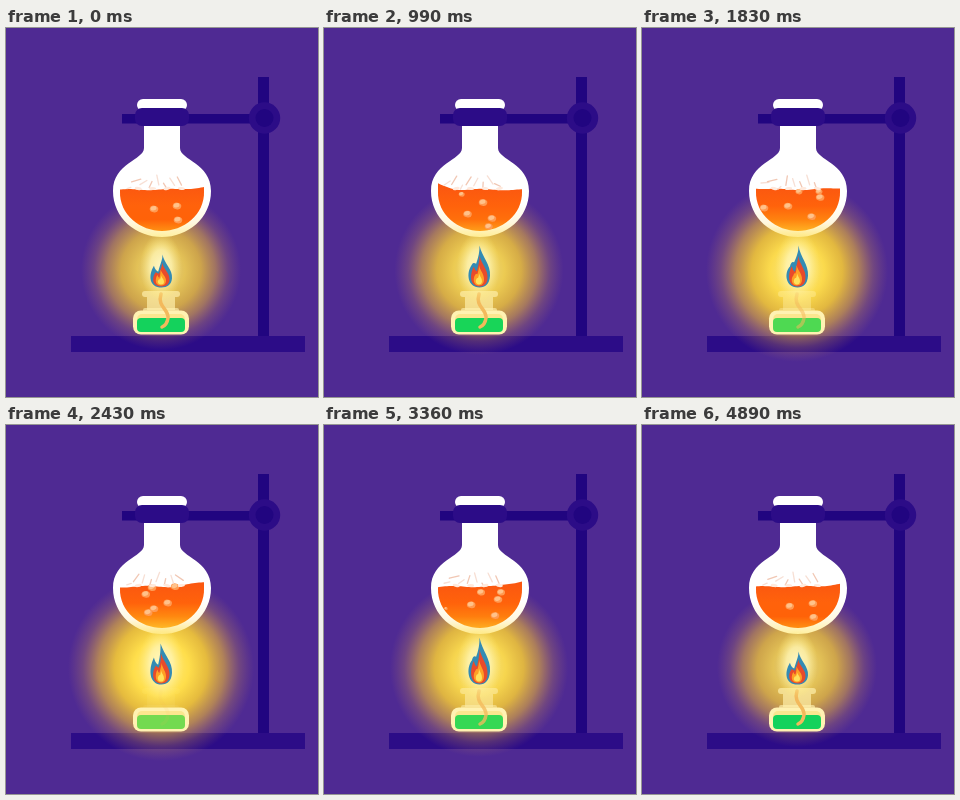
Recreate the animation shown at these times as an HTML page with a canvas. Size 312 by 369 pixels, loop 4.92 s.

```html
<!DOCTYPE html>
<html lang="en">
<head>
<meta charset="utf-8">
<title>Flask over a burner</title>
<style>
html, body { margin: 0; width: 100%; height: 100%; overflow: hidden; background: #4f2a93; }
canvas { display: block; width: 312px; height: 369px; }
</style>
</head>
<body>
<canvas id="stage" width="312" height="369"></canvas>
<script>
const c = document.getElementById('stage').getContext('2d');
const LOOP = 4920, BOIL = 1640, STEP = 30, TAU = Math.PI * 2;
const DARK = '#210580', MID = '#2c0c87';

// Smooth interpolation through [time, value...] rows.
function keyed(rows, t) {
  let i = 0;
  while (i < rows.length - 2 && t >= rows[i + 1][0]) i++;
  const a = rows[i], b = rows[i + 1];
  const u = (t - a[0]) / (b[0] - a[0]);
  const e = u * u * (3 - 2 * u);
  return a.slice(1).map((v, k) => v + (b[k + 1] - v) * e);
}

function box(x, y, w, h, r, fill) {
  c.fillStyle = fill;
  c.beginPath();
  c.roundRect(x, y, w, h, r);
  c.fill();
}

function oval(x, y, rx, ry, fill, turn = 0) {
  c.fillStyle = fill;
  c.beginPath();
  c.ellipse(x, y, rx, ry, turn, 0, TAU);
  c.fill();
}

function shade(g, stops) {
  for (const [p, color] of stops) g.addColorStop(p, color);
  return g;
}

function stand() {
  box(252, 49, 11, 259, 0, DARK);
  box(65, 308, 234, 16, 0, MID);
}

function clamp() {
  box(116, 86, 140, 9.5, 0, DARK);
  box(129, 80, 54, 18, 7, MID);
  oval(258.5, 90, 15.7, 15.7, MID);
  oval(258.5, 90, 9, 9, DARK);
}

function glow(heat) {
  const r = 80 + 13 * heat, a = 0.84 + 0.16 * heat;
  const y = 242 + heat;
  const g = c.createRadialGradient(155, y, 0, 155, y, r);
  c.fillStyle = shade(g, [
    [0, `rgba(255,238,140,${a})`],
    [0.3, `rgba(255,222,75,${a})`],
    [0.5, `rgba(250,207,50,${a * 0.88})`],
    [0.68, `rgba(240,188,50,${a * 0.6})`],
    [0.84, `rgba(225,165,65,${a * 0.24})`],
    [1, 'rgba(205,140,90,0)']
  ]);
  c.fillRect(155 - r, y - r, r * 2, r * 2);
}

function burner(heat) {
  const fade = heat ** 4;
  c.globalAlpha = 0.68 - 0.6 * fade;
  box(136, 263, 38, 6, 3, '#fff0ae');
  box(141, 269, 28, 13, 0, '#fff0ae');
  box(137, 280, 36, 5, 2, '#fff0ae');
  c.globalAlpha = 1;
  box(127, 282.5, 56, 24, 8, '#fff2b2');
  box(131, 286, 48, 17, 5, '#fbe68f');
  const green = `rgb(${20 + 95 * heat ** 3},${210 + 8 * heat},${92 - 12 * heat})`;
  box(131, 290, 48, 14, 4, green);
  c.globalAlpha = 1 - 0.9 * fade;
  c.strokeStyle = '#f3b95c';
  c.lineWidth = 3.5;
  c.lineCap = 'round';
  c.beginPath();
  c.moveTo(155, 266);
  c.bezierCurveTo(151, 279, 163, 281, 162, 290);
  c.quadraticCurveTo(161, 297, 156, 299);
  c.stroke();
  c.globalAlpha = 1;
}

function flask(heat) {
  const warm = `rgb(255,${240 - 8 * heat},${160 - 30 * heat})`;
  box(131, 71, 50, 12, 6, '#fff');
  c.fillStyle = shade(c.createLinearGradient(0, 80, 0, 209), [
    [0, '#fff'], [0.74, '#fff'], [0.89, '#fff8df'], [1, warm]
  ]);
  c.beginPath();
  c.moveTo(138, 79);
  c.lineTo(138, 120);
  c.bezierCurveTo(138, 132, 107, 135, 107, 163);
  c.bezierCurveTo(107, 190, 130, 209, 156, 209);
  c.bezierCurveTo(182, 209, 205, 190, 205, 163);
  c.bezierCurveTo(205, 135, 174, 132, 174, 120);
  c.lineTo(174, 79);
  c.fill();
}

// Surface height over time: left side, right side.
const SLOSH = [[0, 162, 159], [990, 156, 162], [1830, 160, 160], [2430, 162, 157],
  [3360, 162, 156], [4050, 155, 161], [LOOP, 162, 159]];

// Slow bubbles: birth time and place, place at each boil start, end time and place.
const RISERS = [
  [-1160, 140, 190, 148, 181, 1150, 136, 164],
  [-840, 167, 194, 171, 178, 400, 186, 160],
  [-800, 163, 200, 172, 192, 1300, 155, 169]
];

// Short-lived bubbles: time, x, y.
const POPS = [[120, 157, 166], [120, 177, 166], [190, 122, 180],
  [780, 146, 163], [780, 169, 162], [780, 148, 184]];

function bubble(x, y, s) {
  oval(x, y, 4.3 * s, 3.3 * s, '#ff9a52', 0.2);
  oval(x - 0.5, y - 0.7, 3 * s, 2.1 * s, '#ffc28a', -0.3);
}

function bubbles(p) {
  for (const [t0, x0, y0, x, y, t1, x1, y1] of RISERS) {
    for (const q of [p, p - BOIL]) {
      if (q < t0 || q > t1) continue;
      const u = q < 0 ? q / t0 : q / t1;
      const [ex, ey] = q < 0 ? [x0, y0] : [x1, y1];
      bubble(x + (ex - x) * u, y + (ey - y) * u, Math.min(1, (1 - u) * 5));
    }
  }
  for (const [t, x, y] of POPS) {
    const u = (p - t) / 120;
    if (Math.abs(u) < 1) bubble(x, y - 4 * u, Math.sqrt(1 - u * u));
  }
}

function liquid(t, heat) {
  const [left, right] = keyed(SLOSH, t);
  const w = t / BOIL * TAU;
  const surface = x => {
    const l = Math.max(0, (140 - x) / 26), r = Math.max(0, (x - 172) / 26);
    return 161.5 + (left - 161.5) * l * l + (right - 161.5) * r + 0.7 * Math.sin(x / 7 - 3 * w);
  };
  c.save();
  c.beginPath();
  c.moveTo(114, 145);
  c.lineTo(198, 145);
  c.lineTo(198, 163);
  c.bezierCurveTo(199, 187, 177, 203, 156, 203);
  c.bezierCurveTo(135, 203, 113, 187, 114, 163);
  c.clip();

  c.fillStyle = shade(c.createLinearGradient(0, 159, 0, 204), [
    [0, '#fb5810'], [0.42, '#ff620b'],
    [0.72, `rgb(255,${98 + 38 * heat},${8 + 8 * heat})`],
    [1, `rgb(255,${148 + 40 * heat},${20 + 20 * heat})`]
  ]);
  c.beginPath();
  c.moveTo(113, 205);
  for (let x = 113; x <= 199; x += 2) c.lineTo(x, surface(x));
  c.lineTo(199, 205);
  c.fill();
  bubbles(t % BOIL);
  c.restore();

  // Flecks thrown up along the surface.
  c.lineCap = 'round';
  c.lineWidth = 1.3;
  for (let i = 0; i < 8; i++) {
    const jump = Math.sin((t / BOIL * 2 + i * 0.381) % 1 * Math.PI);
    const x = 123 + i * 7.2, y = 160 - 8 * jump, size = 2 + 3 * jump;
    const turn = -0.35 - i * 0.28 + 0.4 * Math.sin(w + i);
    const dx = size * Math.cos(turn), dy = size * Math.sin(turn);
    c.strokeStyle = i % 2 ? 'rgba(238,185,160,.8)' : 'rgba(246,220,207,.9)';
    c.beginPath();
    c.moveTo(x - dx, y - dy);
    c.lineTo(x + dx, y + dy);
    c.stroke();
    if (i % 2) oval(x + 2, 160.5, 3.5, 1.5, '#ffe9dc', 0.2 * Math.sin(w + i));
  }
}

// Flame poses: time, height, side tongue, lean.
const FLAME = [[0, 33, 1, 1], [480, 40, .3, 1], [990, 42, .3, 0], [1400, 35, .9, -1],
  [1830, 42, 0, 1], [2430, 41, 1, -1], [2900, 35, .4, 1], [3360, 47, .1, 0],
  [4050, 33, .7, 1], [4450, 40, .2, 0], [LOOP, 33, 1, 1]];

function tongue(x, y, h, w, side, lean, fill) {
  const notch = 0.6 - 0.12 * side;
  c.fillStyle = fill;
  c.beginPath();
  c.moveTo(x, y);
  c.bezierCurveTo(x - w * 1.15, y, x - w * 1.3, y - h * 0.35, x - w * 0.72, y - h * (0.5 + 0.16 * side));
  c.quadraticCurveTo(x - w * 0.6, y - h * (notch + 0.04), x - w * 0.32, y - h * notch);
  c.bezierCurveTo(x - w * 0.08, y - h * 0.74, x + lean, y - h * 0.84, x + lean, y - h);
  c.bezierCurveTo(x + w * 0.25, y - h * 0.72, x + w * 1.08, y - h * 0.55, x + w, y - h * 0.28);
  c.bezierCurveTo(x + w * 0.95, y - h * 0.08, x + w * 0.55, y, x, y);
  c.fill();
}

function halo(t, heat) {
  c.save();
  c.translate(155 + Math.sin(t / LOOP * TAU * 3), 239);
  c.scale(0.62, 1);
  const r = 34 + 3 * heat;
  c.fillStyle = shade(c.createRadialGradient(0, 0, 0, 0, 0, r), [
    [0, 'rgba(255,249,200,.95)'], [0.5, 'rgba(255,244,175,.8)'], [1, 'rgba(255,233,120,0)']
  ]);
  c.fillRect(-r, -r, r * 2, r * 2);
  c.restore();
}

function flame(t) {
  const [h, side, lean] = keyed(FLAME, t);
  tongue(155.5, 259.5, h, 10.5, side, lean, '#338bb4');
  tongue(155.5, 258.5, h * 0.73, 8, 1 - side * 0.4, lean * 0.6, '#e84b2b');
  tongue(155, 257.5, h * 0.48, 5, side, -lean * 0.5, '#ff9f25');
  tongue(155, 256.5, h * 0.27, 3, 0.3, 0, '#ffe15b');
}

function draw(t) {
  const heat = (1 - Math.cos(t / LOOP * TAU)) / 2;
  c.fillStyle = '#4f2a93';
  c.fillRect(0, 0, 312, 369);
  stand();
  glow(heat);
  flask(heat);
  liquid(t, heat);
  clamp();
  burner(heat);
  halo(t, heat);
  flame(t);
}

const start = performance.now();
function tick() {
  const t = (performance.now() - start) % LOOP;
  draw(Math.floor(t / STEP) * STEP);
  requestAnimationFrame(tick);
}
tick();
</script>
</body>
</html>
```
